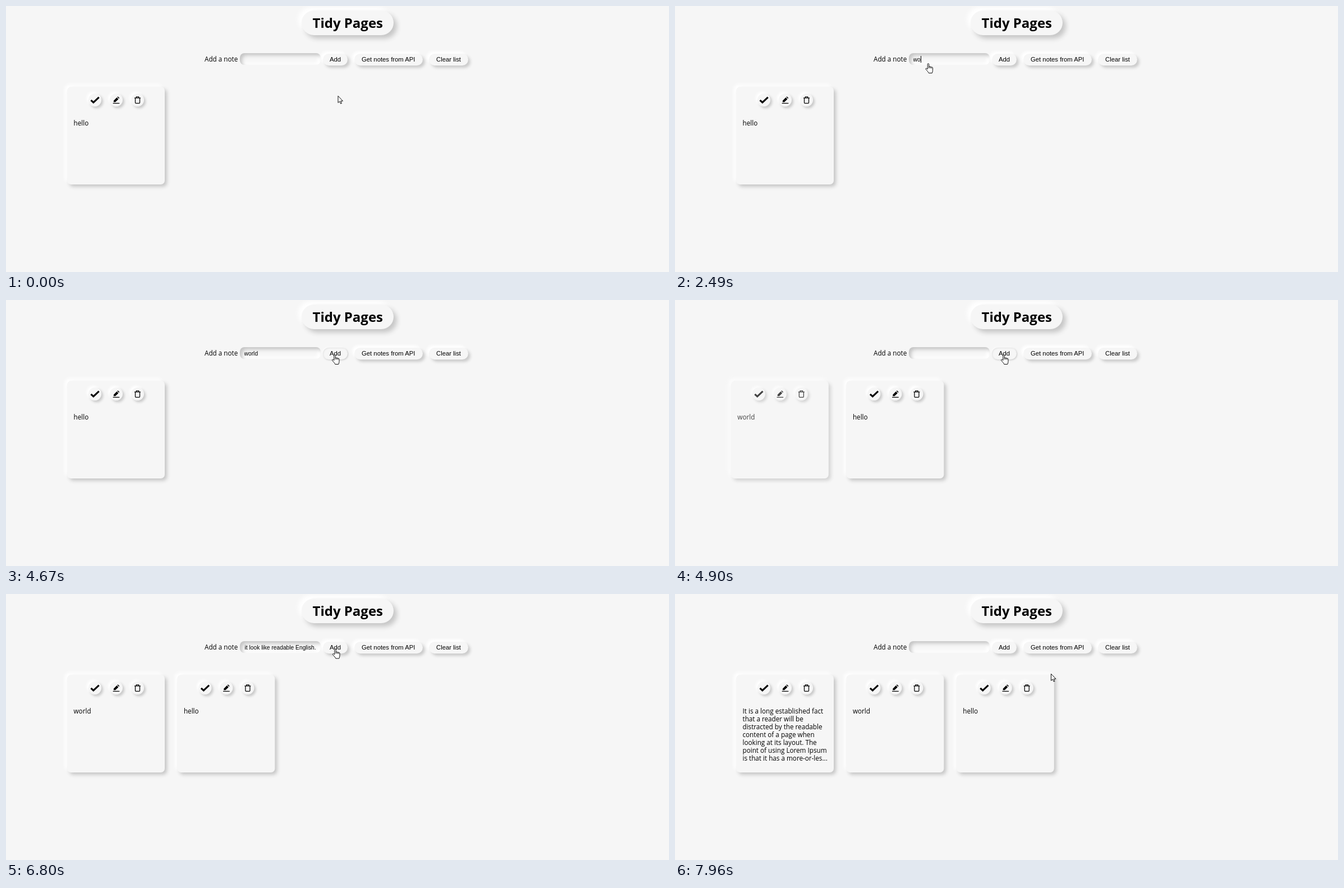
An HTML page for the animation above (8 s loop, 1182 by 474 pixels).

```html
<!DOCTYPE html>
<html lang="en">
<head>
<meta charset="utf-8">
<title>Tidy Pages</title>
<style>
  html, body { margin: 0; width: 100%; height: 100%; overflow: hidden; background: #f6f6f6; }
  #stage { position: relative; width: 1182px; height: 474px; overflow: hidden; color: #000;
    font: 11.7px/14px "Open Sans", "Noto Sans", sans-serif; }
  #stage > *, .card > * { position: absolute; box-sizing: border-box; white-space: pre; }
  h1 { left: 527px; top: 8px; width: 163.5px; height: 44px; margin: 0; border-radius: 22px;
    padding-left: 1px; font-size: 24px; line-height: 44px; font-weight: 700; text-align: center;
    background: #f6f6f6; box-shadow: 6px 6px 9px #c6c6c6, -6px -6px 9px #fff; }
  .label { left: 354px; top: 86.5px; }
  .field { left: 417px; top: 84px; width: 144px; height: 21px; border-radius: 8px;
    box-shadow: inset 4px 4px 6px #c4c4c4, inset -4px -4px 6px #fff; }
  .value { left: 424.6px; top: 88.5px; width: 129px; height: 13px; display: flex; overflow: hidden;
    font: 10.25px/13px "Liberation Sans", Arial, sans-serif; }
  .value span { flex: none; }
  .caret { flex: none; width: 1px; height: 12px; background: #000; }
  .button { top: 84.5px; height: 21px; border-radius: 10.5px; text-align: center; background: #f6f6f6;
    font: 11.3px/21px "Liberation Sans", Arial, sans-serif;
    box-shadow: 4px 4px 5px #cbcbcb, -4px -4px 5px #fff; }
  .button.pressed { box-shadow: 1px 1px 3px #c6c6c6, -1px -1px 3px #fff, inset 1px 1px 2px #e4e4e4; }
  .card { left: 109px; top: 144px; width: 173.5px; height: 173.5px; border-radius: 7px; background: #f6f6f6;
    box-shadow: 4px 4px 6px #c6c6c6, -4px -4px 6px #fff; }
  .card p { left: 11.5px; top: 57px; margin: 0; }
  .icon { top: 11.5px; width: 23px; height: 23px; border-radius: 50%; background: #f6f6f6;
    box-shadow: 3px 3px 4px #c8c8c8, -3px -3px 4px #fff; }
  .icon svg { display: block; width: 23px; height: 23px; }
  .pointer { left: 0; top: 0; width: 16px; height: 20px; overflow: visible;
    fill: #fff; stroke: #000; stroke-width: .95; stroke-linejoin: round; }
</style>
</head>
<body>
<div id="stage">
  <h1>Tidy Pages</h1>
  <div class="label">Add a note</div>
  <div class="field"></div>
  <div class="value"><span></span><i class="caret"></i></div>
  <div class="button" id="add" style="left:565px;width:44px">Add</div>
  <div class="button" style="left:621px;width:121.5px">Get notes from API</div>
  <div class="button" style="left:754px;width:70px">Clear list</div>
</div>
<script>
const LOOP = 8000;
const BLINK = 530;        // caret half period
const PRESS = 250;        // press until the note is added
const ENTER = 130;        // slide-in of a new note
const CARD_STEP = 196.4;
const ICON_STEP = 38.4;

const stage = document.getElementById('stage');
const field = stage.querySelector('.value');
const typed = field.querySelector('span');
const caret = field.querySelector('.caret');
const addButton = document.getElementById('add');

const PASTE_START = 'It is a long established fact that a reader will be distracted';
const PASTE_END = 'making it look like readable English.';
const notes = [
  'It is a long established fact\nthat a reader will be\ndistracted by the readable\ncontent of a page when\n' +
  'looking at its layout. The\npoint of using Lorem Ipsum\nis that it has a more-or-les...',
  'world',
  'hello'
];

const icons = [
  '<path d="M-7 .3L-2.6 4.4 7.2-4.8" fill="none" stroke="#000" stroke-width="3.1"/>',
  '<path d="M-4.6 3.8V1.2L1-4.4 3.9-1.6-1.5 3.8ZM1.8-5.2L2.9-6.2 5.8-3.4 4.7-2.4ZM-5.8 5.3H5.8V6.6H-5.8Z"/>',
  '<path d="M-5.5-3.6H5.5M-4-3.6V4.6Q-4 5.9-2.7 5.9H2.7Q4 5.9 4 4.6V-3.6M-2.2-3.6V-5.6H2.2V-3.6"' +
  ' fill="none" stroke="#000" stroke-width="1.25"/>'
];

const cards = notes.map(text => {
  const card = document.createElement('div');
  card.className = 'card';
  card.innerHTML = icons.map((shape, i) =>
    `<div class="icon" style="left:${37.5 + i * ICON_STEP}px"><svg viewBox="-11.5 -11.5 23 23">${shape}</svg></div>`
  ).join('') + `<p>${text}</p>`;
  stage.append(card);
  return card;
});

function makePointer(d) {
  stage.insertAdjacentHTML('beforeend', `<svg class="pointer"><path d="${d}"/></svg>`);
  return stage.lastElementChild;
}
const arrow = makePointer('M0 .3V12.4L2.7 9.9 4.6 14.1 6.5 13.3 4.7 9.3H8.5Z');
const hand = makePointer('M-1.2 10.6V1.8Q-1.2.5 0 .5T1.2 1.8V6.6Q1.3 5.7 2.4 5.7T3.6 7Q3.8 6.2 4.8 6.2T5.9 7.6' +
  'Q6.1 7 6.9 7T8 8.3V12.5Q8 14.5 6.8 17.5H.8Q0 15.5-1.8 13.6L-4.3 10.8Q-4.9 10-4.2 9.3T-2.6 9.3Z' +
  'M1.2 6.6V9M3.6 7V9.2M5.9 7.6V9.4');

// User actions
const focuses = [1180, 5410];
const keys = [2400, 2490, 3030, 3200, 3270];
const paste = 6190;
const presses = [4640, 7420];

// Pointer moves: where it goes, from when to when
const home = { x: 592, y: 160 };
const moves = [
  { from: 130, to: 890, x: 447.7, y: 98 },
  { from: 1180, to: 1320, x: 451.5, y: 102 },
  { from: 4080, to: 4600, x: 586, y: 97 },
  { from: 4910, to: 5480, x: 520.3, y: 95 },
  { from: 6330, to: 7000, x: 605, y: 98 },
  { from: 7000, to: 7420, x: 590, y: 94 },
  { from: 7670, to: 7960, x: 670.5, y: 142 }
];

const clamp = p => Math.min(1, Math.max(0, p));
const mix = (a, b, p) => a + (b - a) * p;
const smooth = p => p * p * (3 - 2 * p);
const past = (times, t) => times.filter(time => time <= t);

function pointerAt(t) {
  return moves.reduce((at, m) => {
    const p = smooth(clamp((t - m.from) / (m.to - m.from)));
    return { x: mix(at.x, m.x, p), y: mix(at.y, m.y, p) };
  }, home);
}

function fieldText(t, added) {
  if (added === 0) return notes[1].slice(0, past(keys, t).length);
  if (added === 2 || t < paste) return '';
  return t < presses[1] ? PASTE_END : PASTE_START;
}

// The caret restarts its blink at every focus, key or paste.
function caretVisible(t) {
  const focused = past(focuses, t).length > past(presses, t).length;
  const last = Math.max(...past([...focuses, ...keys, paste], t));
  return focused && (t - last) % (2 * BLINK) < BLINK;
}

function render(t) {
  const { x, y } = pointerAt(t);
  const overControls = y < 106;
  arrow.style.display = overControls ? 'none' : '';
  hand.style.display = overControls ? '' : 'none';
  arrow.style.transform = hand.style.transform = `translate(${x}px, ${y}px)`;

  const additions = past(presses.map(p => p + PRESS), t);
  const text = fieldText(t, additions.length);
  if (typed.textContent !== text) typed.textContent = text;
  field.style.justifyContent = text === PASTE_END ? 'flex-end' : 'flex-start';
  caret.style.visibility = caretVisible(t) ? 'visible' : 'hidden';
  addButton.classList.toggle('pressed', presses.some(p => t >= p && t < p + PRESS + 50));

  const first = notes.length - 1 - additions.length;
  const entered = additions.length ? clamp((t - additions.at(-1)) / ENTER) : 1;
  cards.forEach((card, i) => {
    const p = i === first ? entered : 1;
    card.style.display = i < first ? 'none' : '';
    card.style.transform = `translateX(${(i - first) * CARD_STEP - 10 * (1 - p)}px)`;
    card.style.opacity = mix(0.7, 1, p);
  });
}

const begin = performance.now();
function tick() {
  render((performance.now() - begin) % LOOP);
  requestAnimationFrame(tick);
}
tick();
</script>
</body>
</html>
```
